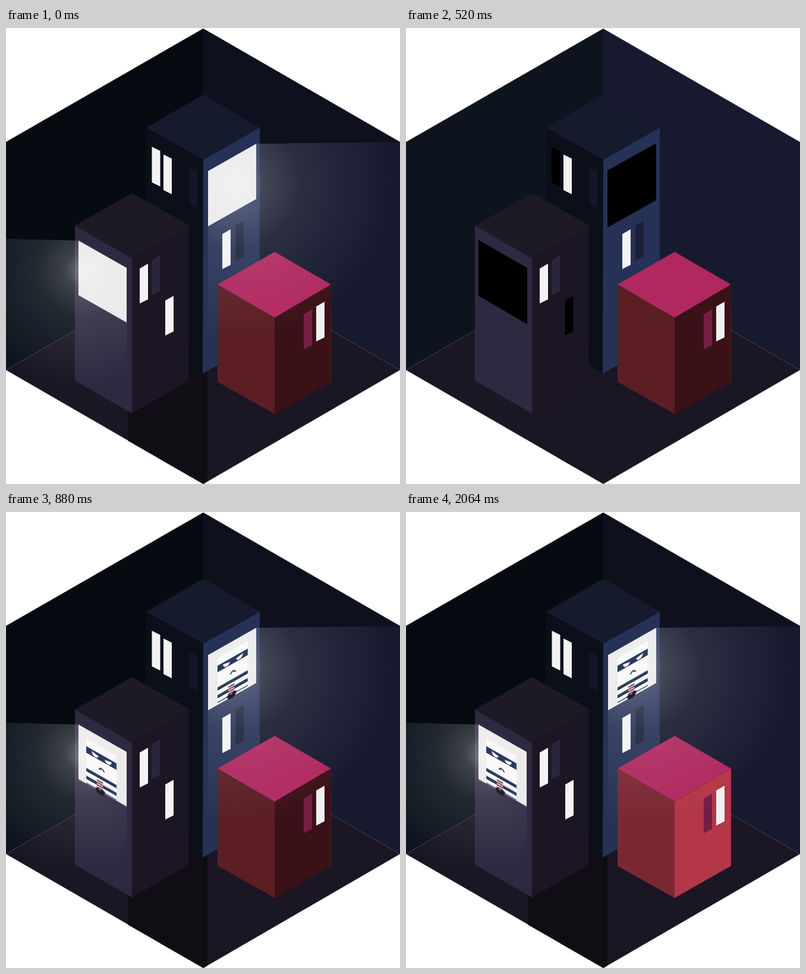
An HTML page for the animation above (2.8 s loop, 663 by 768 pixels).

```html
<!DOCTYPE html>
<html lang="en">
<head>
<meta charset="utf-8">
<title>Night blocks</title>
<style>
  html, body { margin: 0; width: 100%; height: 100%; overflow: hidden; background: #fff; }
  svg { display: block; width: 100vw; height: 100vh; }
  .lit, .unlit, .visitor, .hot { animation: 2800ms step-end infinite; }
  .lit { animation-name: lit; }
  .unlit { animation-name: unlit; }
  .visitor { animation-name: visitor; }
  .hot { animation-name: hot; }
  /* blackout from 160 to 760 ms, visitor from 760 ms, hot cube from 960 ms */
  @keyframes lit { 0% { opacity: 1 } 5.7143% { opacity: 0 } 27.1429%, 100% { opacity: 1 } }
  @keyframes unlit { 0% { opacity: 0 } 5.7143% { opacity: 1 } 27.1429%, 100% { opacity: 0 } }
  @keyframes visitor { 0% { opacity: 0 } 27.1429%, 100% { opacity: 1 } }
  @keyframes hot { 0% { opacity: 0 } 34.2857%, 100% { opacity: 1 } }
</style>
</head>
<body>
<svg viewBox="0 0 663 768">
  <defs>
    <radialGradient id="glowLeft" gradientUnits="userSpaceOnUse" cx="130" cy="408" r="200">
      <stop offset="0" stop-color="#fff" stop-opacity=".4"/>
      <stop offset=".16" stop-color="#fff" stop-opacity=".2"/>
      <stop offset=".4" stop-color="#fff" stop-opacity=".09"/>
      <stop offset="1" stop-color="#fff" stop-opacity="0"/>
    </radialGradient>
    <radialGradient id="glowRight" href="#glowLeft" gradientUnits="userSpaceOnUse" cx="388" cy="263" r="270"/>
    <path id="pane" d="M0 0L14 -8V52L0 59Z"/>
    <path id="paneBack" d="M0 0L14 7V67L0 60Z"/>
    <g id="burglar">
      <path fill="#fafafa" d="M13 16H64V91H13Z"/>
      <g fill="#2b3a60">
        <path d="M13 29H64V40H13Z"/>
        <path d="M13 65.5H64V71H13Z"/>
        <path d="M13 78.5H64V84H13Z"/>
        <path d="M13 90H64V91.5H13Z"/>
      </g>
      <path fill="#fff" d="M22 32L34 34.5Q32 39 28 39Q23 38 22 32ZM44 34.5L56 32Q55 38 50 39Q46 39 44 34.5Z"/>
      <path fill="none" stroke="#222b46" stroke-width="2" d="M34.500 56Q38.500 49 43.500 56"/>
      <path fill="#f4e9e9" d="M31 74H41V90H31Z"/>
      <path stroke="#6b2331" stroke-width="2" d="M31 75.500H41M31 79.500H41M31 83.500H41M31 87.500H41"/>
      <path fill="#20212f" d="M28 90L32 88L36 90L41 87L45 89L43 95L38 98L31 96Z"/>
    </g>
  </defs>

  <!-- room -->
  <path fill="#0d141d" d="M0 192L332 1V385L0 576Z"/>
  <path fill="#171a2f" d="M332 1L663 192V576L332 385Z"/>
  <path fill="#1b1624" d="M0 576L332 385L663 576L332 768Z"/>
  <g class="lit">
    <path fill="#060b12" d="M332 1V385L212 454V409L122 358L0 355V192Z"/>
    <path fill="#0e101d" d="M332 1L663 192L421 195L339 241V389L332 385Z"/>
    <path fill="#100d15" d="M205 458L332 385L339 389V764L332 768L205 695Z"/>
  </g>

  <!-- tall tower -->
  <path fill="#161a2d" d="M332 112L427 168L332 222L236 168Z"/>
  <path fill="#0b0f1a" d="M236 168L332 222L331 582L236 527Z"/>
  <path fill="#263156" d="M332 222L427 168V527L331 582Z"/>
  <use href="#paneBack" x="265" y="213" fill="#f3f3f3"/>
  <use href="#paneBack" x="308" y="235" fill="#14172b"/>
  <use href="#pane" x="364" y="347" fill="#f3f3f3"/>
  <use href="#pane" x="386" y="333" fill="#1a2038"/>
  <g class="unlit">
    <use href="#paneBack" x="245" y="200"/>
    <path d="M339 240L421 194V290L339 336Z"/>
  </g>
  <g class="lit">
    <use href="#paneBack" x="245.500" y="200" fill="#f3f3f3"/>
    <path fill="#e9e9e9" d="M340 241L421 195V288L340 334Z"/>
  </g>

  <!-- short tower -->
  <path fill="#1d1a26" d="M212 278L308 332L212 388L116 333Z"/>
  <path fill="#2e2940" d="M116 333L212 388V649L116 594Z"/>
  <path fill="#1c1624" d="M212 388L308 332L307 594L212 649Z"/>
  <use href="#pane" x="225" y="405" fill="#f3f3f3"/>
  <use href="#pane" x="245" y="391" fill="#2c2540"/>
  <g class="unlit">
    <use href="#pane" x="267.500" y="459"/>
    <path d="M122 357L204 404V499L122 451Z"/>
  </g>
  <g class="lit">
    <use href="#pane" x="268" y="459" fill="#f3f3f3"/>
    <path fill="#e9e9e9" d="M122 358L203 404V496L122 450Z"/>
  </g>

  <!-- cube -->
  <path fill="#b0285f" d="M452 377L547 432L452 488L356 432Z"/>
  <path fill="#5a1e23" d="M356 432L452 488V650L356 596Z"/>
  <path fill="#3a1116" d="M452 488L547 432V596L452 650Z"/>
  <path stroke="#5e1d22" d="M546.500 470V596"/>
  <g class="hot">
    <path fill="#7b2732" d="M356 432L452 488V650L356 596Z"/>
    <path fill="#b33747" d="M452 488L547 432V596L452 650Z"/>
  </g>
  <use href="#pane" x="501" y="482" fill="#751e45"/>
  <use href="#pane" x="522" y="469" fill="#f0f0f0"/>

  <!-- light cones -->
  <g class="lit">
    <path fill="url(#glowLeft)" d="M0 355L122 358L203 404L205 695L0 576Z"/>
    <path fill="url(#glowRight)" d="M421 195L663 192V576L339 764L340 241Z"/>
  </g>
  <g class="visitor">
    <use href="#burglar" transform="matrix(1 .568 0 1 122 358)"/>
    <use href="#burglar" transform="matrix(1 -.568 0 1 340 241) translate(3 -2)"/>
  </g>
</svg>
</body>
</html>
```
